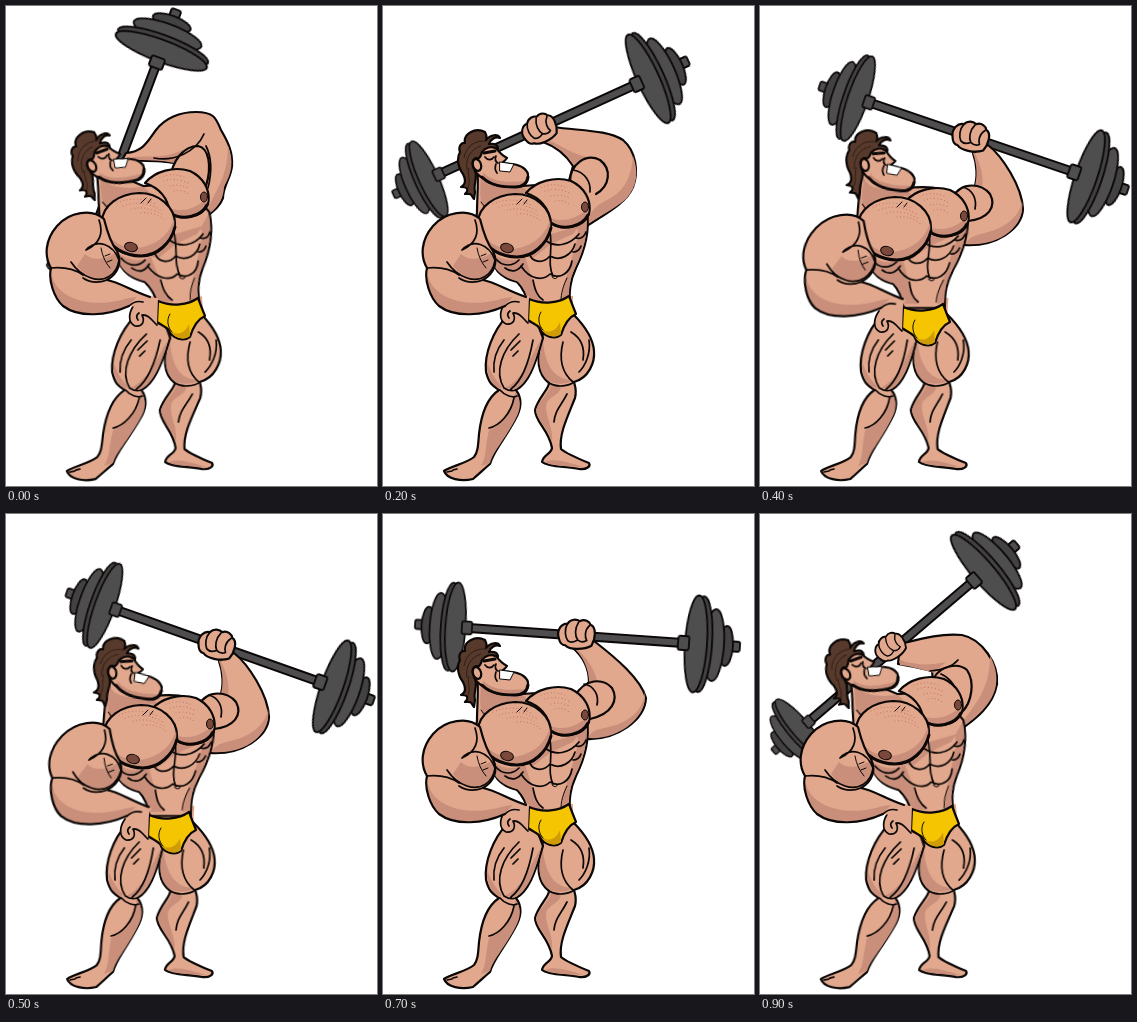
Recreate the animation shown at these times as an HTML page without scripts. Size 371 by 480 pixels, loop 1 s.

```html
<!DOCTYPE html>
<html lang="en">
<head>
<meta charset="utf-8">
<title>Strongman lifting a barbell</title>
<style>
html, body { margin: 0; width: 100%; height: 100%; overflow: hidden; background: #fff; }
svg { display: block; width: 100%; height: 100%; }

.skin { fill: #e1a88d; }
.ink { stroke: #0b0706; stroke-width: 2.2; stroke-linejoin: round; stroke-linecap: round; }
.line { fill: none; stroke-width: 1.7; }
.bold { fill: none; stroke-width: 3; }
.thin { fill: none; stroke-width: 1; }
.shade { fill: #c98f7b; stroke: none; }
.iron { fill: #4f4e4e; stroke-width: 1.8; }
.dark { fill: #434242; }
.brown { fill: #7a493b; stroke-width: 1; }
.dots { fill: none; stroke: #c4715f; stroke-width: 1.1; stroke-linecap: round; stroke-dasharray: 0 3.5; }

/* hard steps, one pose per 100 ms, there and back */
.bell, .far, .head, .torso, .legs, .trunks, .flex, .pecL, .pecR, .arm { animation: 1s step-end infinite; }
.arm { opacity: 0; }
.bell { animation-name: bell; }
.far { animation-name: far; }
.head { animation-name: head; transform-origin: 115px 185px; }
.torso { animation-name: torso; transform-origin: 0 215px; }
.legs { animation-name: legs; transform-origin: 0 460px; }
.trunks { animation-name: trunks; }
.flex { animation-name: flex; transform-origin: 0 300px; }
.pecL { animation-name: pecL; }
.pecR { animation-name: pecR; }
.a { animation-name: showA; }
.b { animation-name: showB; }
.c { animation-name: showC; }
.d { animation-name: showD; }
.e { animation-name: showE; }

@keyframes bell {
  0%, 100% { transform: translate(156px, 43px) rotate(-69.5deg); }
  10%, 90% { transform: translate(225px, 57px) rotate(-40.5deg); }
  20%, 80% { transform: translate(267px, 72px) rotate(-24.5deg); }
  30%, 70% { transform: translate(315px, 130px) rotate(4deg); }
  40%, 60% { transform: translate(328px, 171px) rotate(18.8deg); }
  50% { transform: translate(328px, 173px) rotate(19.5deg); }
}
@keyframes far {
  0%, 100% { transform: translate(-240px, 0) scale(-.68, .68); }
  10%, 90% { transform: translate(-244px, 0) scale(-.82, .78); }
  20%, 80% { transform: translate(-245px, 0) scale(-.88, .85); }
  30%, 40%, 50%, 60%, 70% { transform: translate(-245px, 0) scale(-.92, .92); }
}
@keyframes head {
  0%, 10%, 90%, 100% { transform: translate(-4px, -3px) rotate(-10deg); }
  20%, 30%, 70%, 80% { transform: none; }
  40%, 60% { transform: translate(8px, 2px) rotate(6deg); }
  50% { transform: translate(9px, 2px) rotate(7deg); }
}
@keyframes torso {
  0%, 10%, 90%, 100% { transform: skewX(4.5deg); }
  20%, 30%, 70%, 80% { transform: none; }
  40%, 50%, 60% { transform: translate(3px, 2px) skewX(-3.5deg); }
}
@keyframes legs {
  0%, 10%, 90%, 100% { transform: skewX(-1.9deg); }
  20%, 30%, 70%, 80% { transform: none; }
  40%, 50%, 60% { transform: skewX(1.2deg); }
}
@keyframes trunks {
  0%, 10%, 90%, 100% { transform: translate(6px, 2px); }
  20%, 30%, 70%, 80% { transform: none; }
  40%, 50%, 60% { transform: translate(-3px, 8px); }
}
@keyframes flex {
  0%, 10%, 90%, 100% { transform: translate(1px, 0); }
  20%, 30%, 70%, 80% { transform: none; }
  40%, 50%, 60% { transform: translate(-1px, 2px) skewX(-5deg); }
}
@keyframes pecL {
  0%, 10%, 90%, 100% { transform: translate(1px, -1px); }
  20%, 30%, 70%, 80% { transform: none; }
  40%, 50%, 60% { transform: translate(3px, 3px); }
}
@keyframes pecR {
  0%, 10%, 90%, 100% { transform: translate(-4px, -10px); }
  20%, 30%, 70%, 80% { transform: none; }
  40%, 50%, 60% { transform: translate(2px, 9px); }
}
@keyframes showA { 0% { opacity: 1; } 10%, 100% { opacity: 0; } }
@keyframes showB { 0%, 20%, 100% { opacity: 0; } 10%, 90% { opacity: 1; } }
@keyframes showC { 0%, 30%, 90%, 100% { opacity: 0; } 20%, 80% { opacity: 1; } }
@keyframes showD { 0%, 40%, 80%, 100% { opacity: 0; } 30%, 70% { opacity: 1; } }
@keyframes showE { 0%, 70%, 100% { opacity: 0; } 40% { opacity: 1; } }
</style>
</head>
<body>
<svg viewBox="0 0 371 480" preserveAspectRatio="none">
<defs>
  <g id="plates" class="ink iron">
    <rect x="28" y="-5" width="14" height="10" rx="2"/>
    <ellipse class="dark" cx="28" rx="7" ry="20"/>
    <ellipse cx="16" rx="10" ry="36"/>
    <ellipse class="dark" cx="3" rx="11" ry="48"/>
    <ellipse cx="-2" rx="11" ry="48.5"/>
    <rect x="-20" y="-7" width="11" height="14" rx="2"/>
  </g>
  <g id="fist" class="ink skin">
    <path d="M-17 4C-20-4-15-11-9-11C-6-16 0-16 3-14C8-17 13-14 14-11C20-9 20 2 16 10C8 15-6 15-10 11C-14 11-16 8-17 4Z"/>
    <path class="line" d="M-9-11C-12-5-11 2-8 6M2-13C-2-6-1 1 2 5M13-10C8-5 9 2 11 5M-8 6Q-4 9 2 5Q7 8 11 5"/>
  </g>
</defs>

<g class="bell">
  <rect class="ink iron" x="-236" y="-4" width="230" height="8"/>
  <use class="far" href="#plates"/>
  <use href="#plates"/>
</g>

<g class="arm a">
  <path class="ink skin" d="M120 147C138 146 143 133 150 124C159 112 174 106 190 106C208 106 210 112 215 124C222 136 227 146 226 160C225 172 217 180 217 192C213 202 206 206 200 211L172 196L168 157C155 154 135 155 116 154Z"/>
  <path class="shade" d="M222 140C228 154 226 168 218 180C218 194 210 204 200 210C204 190 222 176 222 140Z"/>
  <path class="shade" d="M126 151C148 150 160 152 176 144L168 157C155 154 140 154 126 154Z"/>
  <path class="ink skin" d="M164 174C166 154 178 140 192 140C203 142 206 160 200 180"/>
  <path class="ink line" d="M148 152C168 156 190 146 198 128M200 140C206 152 206 166 202 182"/>
</g>
<g class="arm b">
  <path class="ink skin" d="M140 130C160 125 180 119 202 121C222 125 239 150 237 170C233 192 216 205 200 216L176 198L172 157C160 154 150 152 138 150Z"/>
  <path class="shade" d="M230 142C240 160 238 178 226 192C217 202 208 209 201 214C206 196 230 184 230 142Z"/>
  <path class="shade" d="M140 146C156 151 168 152 186 148L174 159C160 155 150 152 140 151Z"/>
  <path class="ink skin" d="M174 164C180 152 198 148 207 156C215 168 212 188 202 198"/>
  <path class="ink line" d="M170 157C182 156 192 153 198 146M181 160C190 164 196 172 198 184"/>
  <use href="#fist" transform="translate(130 134) rotate(-32) scale(.85)"/>
</g>
<g class="arm c">
  <path class="ink skin" d="M170 121C200 125 224 124 240 134C253 145 256 166 250 181C243 198 220 209 204 220L178 204L190 160C183 149 174 141 160 136Z"/>
  <path class="shade" d="M250 150C256 166 254 181 243 193C230 204 216 210 205 218C206 206 212 200 224 194C240 186 248 174 250 150Z"/>
  <path class="shade" d="M168 135C178 140 190 148 204 151L191 159C184 148 174 141 164 136Z"/>
  <path class="ink skin" d="M187 176C187 158 203 147 217 154C229 163 227 180 213 188"/>
  <path class="ink line" d="M190 164C202 166 208 176 207 186"/>
  <use href="#fist" transform="translate(156 124) rotate(-22) scale(.95)"/>
</g>
<g class="arm d">
  <path class="ink skin" d="M211 127C233 144 258 165 263 184C262 206 234 226 204 225L178 204L206 168C206 155 200 143 190 134Z"/>
  <path class="shade" d="M262 178C264 206 234 226 205 224C210 212 226 216 242 207C254 200 260 192 262 178Z"/>
  <path class="shade" d="M194 135C204 144 212 156 214 167L206 168C206 155 200 143 192 135Z"/>
  <path class="ink skin" d="M192 182C202 164 220 164 229 174C236 186 229 200 207 205"/>
  <path class="ink line" d="M201 170C212 172 216 182 214 191"/>
  <use href="#fist" transform="translate(193 121) rotate(3)"/>
</g>
<g class="arm e">
  <path class="ink skin" d="M228 139C242 150 262 180 263 203C262 223 236 241 204 239L180 214L214 183C218 172 217 158 213 147Z"/>
  <path class="shade" d="M262 194C266 223 236 241 205 238C212 226 228 229 243 220C255 213 261 204 262 194Z"/>
  <path class="shade" d="M214 146C221 158 224 172 222 182L214 183C218 172 217 158 213 147Z"/>
  <path class="ink skin" d="M192 192C202 174 222 178 230 188C237 201 228 213 208 215"/>
  <path class="ink line" d="M203 181C213 184 217 193 215 203"/>
  <use href="#fist" transform="translate(210 131) rotate(14)"/>
</g>

<g class="legs">
  <path class="ink skin" d="M160 328C153 350 154 368 166 377C166 383 155 392 152 404C152 416 166 424 169 442C168 448 160 449 159 456C166 462 184 460 196 463C204 464 208 460 206 457C196 453 184 448 178 443C176 428 184 412 192 392C194 384 192 380 191 376C206 372 212 356 211 345C210 330 200 318 190 308Z"/>
  <path class="shade" d="M160 336C154 352 155 368 167 376C180 380 188 376 190 374C174 374 163 364 160 336ZM168 378C168 386 156 394 153 404C154 414 165 422 169 436C171 420 160 408 164 396C168 390 178 388 178 380ZM162 456C172 452 184 456 200 461C184 460 170 460 162 456Z"/>
  <path class="ink line" d="M180 336C176 352 178 366 190 376M166 377C174 382 186 380 191 376M206 334C208 348 202 360 196 366M188 326C198 332 202 342 200 354M184 388C178 400 172 404 171 416"/>
  <path class="ink skin" d="M124 310C110 325 101 348 103 366C106 378 110 380 116 384C104 392 98 410 96 428C95 440 95 446 91 451C82 458 68 460 61 465C64 473 78 476 90 473C96 468 100 464 107 458C110 446 120 436 132 414C139 402 139 392 133 384C145 378 152 360 160 332L150 306Z"/>
  <path class="shade" d="M133 383C145 376 152 358 158 334C146 352 142 372 122 382ZM132 388C134 400 118 420 106 424C102 440 104 450 98 460L107 457C110 446 120 436 132 414C139 402 138 392 132 386ZM104 362C106 376 112 380 117 383L119 380C112 374 108 366 104 356Z"/>
  <path class="ink line" d="M136 328C119 344 111 366 121 382Q127 386 133 384M150 334C146 356 140 374 128 383M121 334C113 344 110 356 111 366M117 384C122 390 130 392 134 390M131 392C128 408 116 420 106 422M128 344l9-9M130 350l5-5M64 466l5-1M70 464l4-1"/>
</g>

<g class="torso">
  <path class="skin" d="M128 290L190 290L190 316L128 316Z"/>
  <path class="ink skin" d="M94 160C96 176 94 190 94 206L92 225L108 245C108 262 118 272 134 276C140 282 143 288 146 300L187 300C186 285 187 275 193 262C201 246 207 226 204 206L190 188C176 178 160 178 140 180Z"/>
  <path class="shade" d="M98 170C104 182 122 183 140 181L150 190C128 184 108 192 101 204C96 194 97 184 98 170Z"/>
  <path class="shade" d="M108 246C120 256 134 256 142 250C148 270 152 284 160 296L147 296C142 284 140 280 134 275C118 271 108 262 108 246ZM203 208C206 226 200 246 192 262C186 274 186 284 186 294L179 296C179 280 186 264 190 248C194 236 196 226 194 222ZM140 250L168 228L196 220L190 228L168 238L150 252Z"/>
  <path class="ink line" d="M167 226C170 244 164 258 170 270M146 246C148 257 160 258 167 250C177 256 189 249 192 238M138 260C147 274 160 275 167 268C177 274 187 267 189 255M150 274C152 284 154 290 160 294M162 234C172 242 186 240 196 228M112 252C120 262 130 260 136 254M122 262C130 268 136 264 140 258M193 232Q200 234 203 226M190 246Q196 246 198 240"/>
  <path class="ink thin" d="M169 271q4 4 6-1M184 272C180 280 178 288 178 294M98 196C102 202 108 206 112 206"/>
</g>

<g class="trunks">
  <path class="ink" fill="#f6c502" d="M146 293C160 299 176 297 186 290C189 298 191 303 193 308C186 311 181 319 178 329C172 334 160 331 157 322C153 318 149 317 145 314Z"/>
  <path fill="#cf9c08" d="M157 320C161 328 172 328 177 316L178 328C172 333 160 330 157 320Z"/>
  <path class="ink thin" d="M158 306C154 312 156 320 160 324"/>
</g>

<g class="head">
  <path class="ink skin" d="M88 150C92 140 104 136 113 142C116 146 118 149 124 152C122 155 120 156 119 157L129 158C138 159 146 164 145 171C144 178 140 181 132 181C120 181 108 180 101 173C92 168 88 160 88 150Z"/>
  <path class="shade" d="M100 166C108 176 124 177 143 175C141 180 138 180 132 180C120 180 108 179 101 172Z"/>
  <path class="ink bold" d="M99 171C108 180 120 181 132 181C140 181 144 178 145 171"/>
  <path class="ink thin" style="fill:#fff" d="M117 156L131 158L127 166L117 165Z"/>
  <path class="ink line" d="M102 151C105 155 109 154 111 151M113 150Q111 155 115 157M113 158Q111 163 114 167"/>
  <path class="ink bold" d="M101 147L112 145"/>
  <path class="ink" fill="#573a2b" stroke-width="1.500" d="M91 193C88 190 90 187 82 188C86 184 85 181 78 181C84 178 82 172 80 168C74 160 74 151 77 146C75 141 78 136 82 137C80 128 92 121 102 126C104 130 104 132 103 134C108 128 115 128 117 132C112 130 107 134 106 138C112 137 115 139 115 143C108 139 102 142 99 146C98 150 96 154 93 152C88 154 89 160 92 165C95 172 90 178 92 186Z"/>
  <path fill="none" stroke="#2f1e17" d="M81 152C83 140 92 134 104 135M84 164C82 152 88 143 98 140M85 182C88 174 84 168 86 162"/>
  <ellipse class="ink skin" cx="94" cy="159" rx="4" ry="6" stroke-width="1.500" transform="rotate(-18 94 159)"/>
</g>

<g class="pecR">
  <path class="ink skin" d="M143 187C153 175 172 170 188 175C201 181 209 194 206 208C201 221 180 225 168 217C166 203 158 192 143 187Z"/>
  <path class="shade" d="M206 200C206 221 180 226 168 217L167 212C180 217 196 213 206 200Z"/>
  <path class="ink bold" d="M168 217C180 225 199 221 205 209"/>
  <ellipse class="ink brown" cx="202" cy="201" rx="3.500" ry="5"/>
  <path class="dots" d="M158 181q14-5 26 1M162 185q12-4 24 2M168 190q10-3 20 3M172 195q8-2 14 3"/>
</g>
<g class="pecL">
  <path class="ink skin" d="M95 216C96 200 112 189 132 188C152 188 168 202 168 219C166 236 152 251 134 251C114 251 96 236 95 216Z"/>
  <path class="shade" d="M167 214C170 234 152 251 134 250C116 250 99 238 96 222C106 242 124 246 140 241C154 236 162 228 167 214Z"/>
  <path class="ink bold" d="M98 230C104 243 118 251 134 251C150 251 164 238 168 222"/>
  <ellipse class="ink brown" cx="124" cy="242" rx="6.500" ry="4.500" transform="rotate(14 124 242)"/>
  <path class="dots" d="M110 198q20-9 40 2M116 201q18-7 38 4M124 204q16-4 32 6M134 208q12-2 24 7"/>
  <path class="ink thin" d="M134 198l5-5M141 198l3-4"/>
</g>

<g class="trunks">
  <path class="skin" d="M122 296C117 304 115 314 123 318C131 319 133 313 130 307C137 306 141 314 145 317L146 290L124 288Z"/>
  <path class="ink line" d="M122 297C117 304 115 314 123 318C131 319 133 313 130 307C137 306 141 314 145 317M127 305Q123 308 126 312"/>
</g>
<g class="flex">
  <path class="skin" d="M120 290L146 292L142 302L120 300Z"/>
  <path class="skin" d="M97 213C85 202 62 206 50 220C38 234 37 250 44 262C41 274 47 292 56 300C72 312 100 310 122 300L142 291C125 285 112 276 100 274C112 267 115 256 110 245C103 236 100 225 97 213Z"/>
  <path class="shade" d="M45 270C50 290 76 300 104 296C114 295 122 291 130 291L122 299C100 309 72 311 56 299C48 291 43 278 45 270ZM78 248C86 256 100 253 110 246C114 258 110 268 98 274C84 274 74 266 70 260Z"/>
  <path class="ink" fill="none" d="M122 300C100 310 72 312 56 300C47 292 41 274 44 262C37 250 38 234 50 220C62 206 85 202 97 213C100 225 103 236 110 245C115 256 112 267 100 274C112 276 125 285 143 291"/>
  <path class="ink line" d="M92 214C97 228 92 238 79 244M79 244C90 232 106 238 112 254C110 268 98 277 84 272C75 269 68 262 64 256M44 262C54 261 66 262 76 269M100 274C90 278 82 276 76 272M122 300Q128 294 136 296"/>
  <path class="ink thin" d="M94 242q2 12 9 20M98 250l5-2M100 256l5-2"/>
</g>
</svg>
</body>
</html>
```
